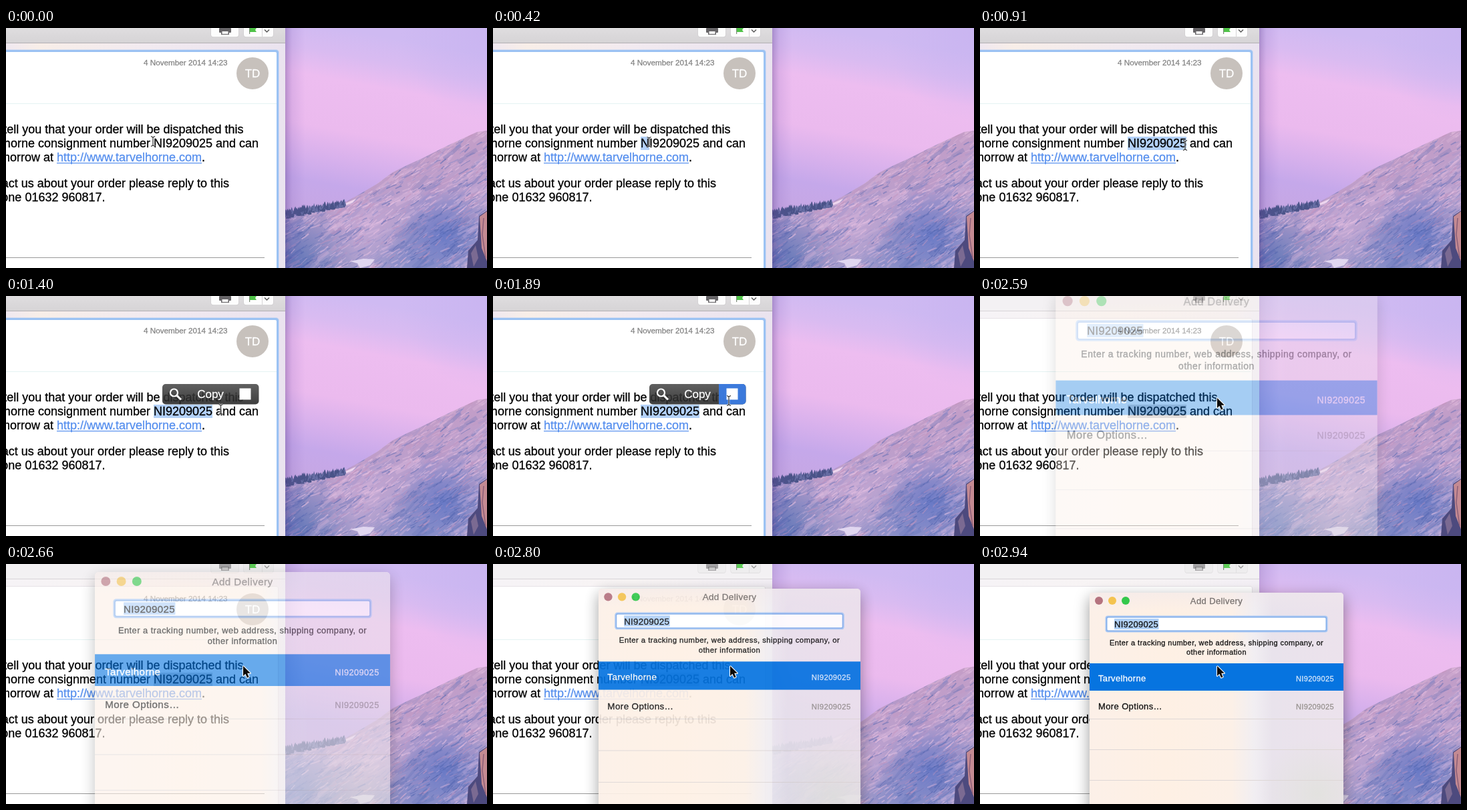
An HTML page with a canvas that plays this animation: 720x360 px, repeating every 4.44 s.

```html
<!DOCTYPE html>
<html lang="en">
<head>
<meta charset="utf-8">
<title>Add Delivery</title>
<style>
html, body { margin: 0; width: 100%; height: 100%; overflow: hidden; background: #fff; }
canvas { display: block; width: 720px; height: 360px; }
</style>
</head>
<body>
<canvas id="stage" width="720" height="360"></canvas>
<script>
const W = 720, H = 360, STEP = 70, LAST = 2940, LOOP = 4440;
const SANS = '"Liberation Sans", Arial, sans-serif';
const NUMBER = 'NI9209025';
const COURIER = 'Tarvelhorne';

const layer = () => Object.assign(document.createElement('canvas'), { width: W, height: H });
const stage = document.getElementById('stage').getContext('2d');
const desktop = layer();
const overlay = layer().getContext('2d');

const clamp = v => Math.max(0, Math.min(1, v));
const ramp = (t, from, to) => clamp((t - from) / (to - from));
const smooth = p => p * p * (3 - 2 * p);

// A hairline stroke gives the slightly heavier desktop text weight.
function text(c, str, x, y, size, color, align = 'left', spacing = 0) {
  c.font = `${size}px ${SANS}`;
  c.letterSpacing = spacing + 'px';
  c.textAlign = align;
  c.fillStyle = c.strokeStyle = color;
  c.lineWidth = .3;
  c.fillText(str, x, y);
  c.strokeText(str, x, y);
}

function rect(c, x, y, w, h, color) {
  c.fillStyle = color;
  c.fillRect(x, y, w, h);
}

function round(c, x, y, w, h, r, color) {
  c.beginPath();
  c.roundRect(x, y, w, h, r);
  c.fillStyle = color;
  c.fill();
}

function disc(c, x, y, r, color) {
  c.beginPath();
  c.arc(x, y, r, 0, Math.PI * 2);
  c.fillStyle = color;
  c.fill();
}

function poly(c, pts, color) {
  c.beginPath();
  pts.forEach(([x, y]) => c.lineTo(x, y));
  c.closePath();
  c.fillStyle = color;
  c.fill();
}

function line(c, pts, color, width) {
  c.beginPath();
  pts.forEach(([x, y], i) => i ? c.lineTo(x, y) : c.moveTo(x, y));
  c.strokeStyle = color;
  c.lineWidth = width;
  c.stroke();
}

function linear(c, x0, y0, x1, y1, stops) {
  const g = c.createLinearGradient(x0, y0, x1, y1);
  stops.forEach(([p, color]) => g.addColorStop(p, color));
  return g;
}

function glow(c, x, y, r, rgb, alpha) {
  const g = c.createRadialGradient(x, y, 0, x, y, r);
  g.addColorStop(0, `rgba(${rgb},${alpha})`);
  g.addColorStop(1, `rgba(${rgb},0)`);
  rect(c, x - r, y - r, 2 * r, 2 * r, g);
}

function random(seed) {
  return () => (seed = (seed * 16807) % 2147483647) / 2147483647;
}

function paintSky(c) {
  rect(c, 0, 0, W, H, linear(c, 500, 0, 450, 270, [
    [0, '#cfbaf2'], [.14, '#d9bbf1'], [.28, '#edbdf0'], [.55, '#ebbaee'], [.72, '#d6b0ec'], [.85, '#c5a8ea'], [1, '#c6a7e4']
  ]));
  glow(c, 720, 10, 130, '198,178,240', .6);
}

// Rock streaks falling down and left across the slope.
function paintStreaks(c, rnd, count, length, width, alpha) {
  for (let i = 0; i < count; i++) {
    const x = 415 + rnd() * 325, y = 150 + rnd() * 215;
    const angle = 2.3 + rnd() * .5, len = length * (.4 + rnd());
    const shade = Math.hypot(x - 650, (y - 312) * 1.2) < 55 || x + 360 - y < 500;
    const k = rnd() + (shade ? .4 : 0);
    const color = k < .45 ? '232,194,226' : k < .65 ? '196,148,190' : k < .85 ? '136,136,200' : '80,100,174';
    const dx = Math.cos(angle) * len, dy = Math.sin(angle) * len;
    line(c, [[x, y], [x + dx * .5, y + dy * (.35 + rnd() * .3)], [x + dx, y + dy]],
      `rgba(${color},${alpha * (.6 + rnd() * .8)})`, width * (.5 + rnd()));
  }
}

function paintDesktop(c) {
  const rnd = random(4127);
  paintSky(c);

  const ridge = [[418, 276], [460, 268], [505, 263], [530, 249], [555, 234], [578, 217],
    [600, 206], [622, 196], [640, 187], [662, 176], [690, 163], [705, 156], [720, 154]];
  c.save();
  c.beginPath();
  ridge.forEach(([x, y]) => c.lineTo(x, y));
  c.lineTo(W, H);
  c.lineTo(418, H);
  c.clip();
  rect(c, 418, 150, 302, 210, linear(c, 590, 180, 640, 360, [
    [0, '#c59dc6'], [.45, '#b99fcd'], [1, '#a09ccb']
  ]));
  glow(c, 430, 350, 95, '84,112,180', .85);
  glow(c, 655, 310, 75, '88,112,196', .8);
  glow(c, 600, 350, 60, '104,124,196', .45);
  glow(c, 540, 300, 60, '204,174,216', .55);

  paintStreaks(c, rnd, 260, 32, 5, .22);
  paintStreaks(c, rnd, 1900, 12, 1.3, .42);

  poly(c, [[515, 350], [535, 346], [552, 347], [545, 356], [530, 360], [526, 353]], '#e0d6f0');
  poly(c, [[508, 263], [524, 256], [519, 262], [509, 266]], '#eed6ee');
  poly(c, [[690, 360], [692, 334], [706, 318], [708, 282], [720, 274], [720, 360]], '#4d4a7e');
  poly(c, [[709, 283], [720, 275], [720, 350], [712, 330]], '#c48a92');
  line(c, [[715, 285], [713, 310], [718, 345]], '#8d5f78', 1.5);
  poly(c, [[696, 338], [703, 326], [707, 345], [700, 358]], '#7b6a92');
  c.restore();

  // Dark forest edge, thinning out to the right.
  for (let i = 0; i < 190; i++) {
    const p = rnd(), x = 415 + p * 92;
    const y = 274 - p * 13 + rnd() * (10 - p * 6);
    const h = 5 + rnd() * 5;
    poly(c, [[x - 2.5, y + 4], [x, y + 4 - h], [x + 2.5, y + 4]], rnd() < .6 ? '#4a5388' : '#666da3');
  }
}

function paintButtons(c, active) {
  c.save();
  c.globalAlpha = active ? 1 : .55;
  const edge = '#cbc9cb';
  round(c, 306.5, -8, 42, 22, 4, edge);
  round(c, 307, -8, 41, 21.3, 3.5, '#fdfdfd');
  round(c, 355.5, -8, 45, 22, 4, edge);
  round(c, 356, -8, 44, 21.3, 3.5, '#fdfdfd');
  rect(c, 383, 0, 1, 13, '#d6d4d6');
  round(c, 319, 0, 18, 7, 1, '#666467');
  rect(c, 322, 4, 12, 6, '#666467');
  rect(c, 323.5, 5, 9, 4, '#f4f4f4');
  line(c, [[387, 2.5], [390.5, 6], [394, 2.5]], '#555', 1.4);
  c.restore();
  rect(c, 364, 0, 1.2, 9, '#7b8a78');
  poly(c, [[365, 0], [375, 0], [373, 3], [375, 6], [365, 6]], active ? '#4fc247' : '#5ecb57');
}

function paintMail(c, active, selected) {
  rect(c, 418, 0, 30, H, linear(c, 418, 0, 448, 0, [
    [0, `rgba(80,50,130,${active ? .34 : .18})`], [.35, 'rgba(110,80,170,.13)'], [1, 'rgba(120,90,180,0)']
  ]));
  rect(c, 0, 0, 418, H, linear(c, 0, 0, 418, 0, active
    ? [[0, '#f0e8f0'], [.12, '#f8eee8'], [.5, '#f2eaf0'], [1, '#eae3ef']]
    : [[0, '#f6f3f6'], [.5, '#f8f4f4'], [1, '#f3eff5']]));
  rect(c, 0, 0, 418, 22, active
    ? linear(c, 0, 0, 0, 22, [[0, '#dfdddf'], [1, '#d6d4d6']]) : '#f3f1f3');
  rect(c, 0, 22, 418, 1, active ? '#b3b0b4' : '#d8d5d8');
  paintButtons(c, active);

  if (active) round(c, -10, 32, 419, 340, 5, 'rgba(155,194,243,.35)');
  round(c, -10, 33, 418, 340, 4, active ? '#9bc2f3' : '#e6e2e7');
  const inset = active ? 3 : 1;
  round(c, -10, 33 + inset, 418 - inset, 340, 2, '#fff');
  text(c, '4 November 2014 14:23', 206, 56, 11.7, '#858585');
  disc(c, 369, 68, 24, '#c7c1bc');
  text(c, 'TD', 369, 74, 17, '#fff', 'center');
  rect(c, 0, 113, 405, 1, '#e4f2f2');
  rect(c, 0, 344, 387, 1, '#999');

  c.font = `18px ${SANS}`;
  c.letterSpacing = '0px';
  if (selected) {
    const w = c.measureText(NUMBER.slice(0, selected)).width;
    rect(c, 221, 163, w, 20, active ? '#b3d1f8' : '#d5d5d8');
  }
  const body = (str, x, y, align = 'right') => text(c, str, x, y, 18, '#000', align);
  body('tell you that your order will be dispatched this', 355.5, 158);
  body(COURIER + ' consignment number ', 221, 179);
  body(NUMBER + ' and can', 221, 179, 'left');
  body('tomorrow at ', 76, 200);
  const link = `http://www.${COURIER.toLowerCase()}.com`;
  text(c, link, 76, 200, 18, '#568fee');
  const end = 76 + c.measureText(link).width;
  rect(c, 76, 202, end - 76, 1.2, '#568fee');
  body('.', end, 200, 'left');
  body('contact us about your order please reply to this', 334, 239);
  body('phone 01632 960817.', 148.5, 260);
}

function paintPopup(c, hover) {
  round(c, 234, 132, 144.5, 30.5, 5,
    linear(c, 0, 132, 0, 162, [[0, 'rgba(74,74,74,.88)'], [1, 'rgba(36,36,36,.88)']]));
  if (hover) round(c, 338, 132, 40.5, 30.5, [0, 5, 5, 0], 'rgba(58,124,228,.94)');
  c.beginPath();
  c.arc(251.5, 145, 5.5, 0, Math.PI * 2);
  c.strokeStyle = '#fff';
  c.lineWidth = 2.2;
  c.stroke();
  line(c, [[255.5, 149], [262, 155.5]], '#fff', 3);
  text(c, 'Copy', 306, 153, 17, '#fff', 'center');
  rect(c, 349.5, 138.5, 17, 17, '#fff');
}

function paintWindow(c) {
  c.save();
  c.shadowColor = 'rgba(0,0,0,.4)';
  c.shadowBlur = 22;
  c.shadowOffsetY = 7;
  round(c, 164, 43, 380, 380, 5, '#f5ebe8');
  c.restore();
  c.save();
  c.beginPath();
  c.roundRect(164, 43, 380, 380, 5);
  c.clip();
  rect(c, 164, 43, 380, 380, linear(c, 164, 0, 544, 0, [
    [0, '#fcf0e8'], [.3, '#fef0e4'], [.56, '#fcf0e7'], [.65, '#f1eef2'], [.72, '#e9e3ec'], [1, '#ece2ec']
  ]));
  glow(c, 505, 345, 85, '226,226,222', .9);
  rect(c, 164, 43, 380, 28, linear(c, 0, 43, 0, 71, [[0, 'rgba(240,232,236,.5)'], [1, 'rgba(240,232,236,0)']]));
  c.restore();

  ['#b5737f', '#f4c350', '#34c84b'].forEach((color, i) => disc(c, 178 + 20 * i, 55, 6, color));
  text(c, 'Add Delivery', 354, 60, 13, '#77716f', 'center', .38);

  round(c, 187.5, 77.5, 333, 25, 4, '#a9c8f3');
  round(c, 189, 79, 330, 22, 3, '#83aeea');
  round(c, 190.5, 80.5, 327, 19, 1.5, '#fff');
  rect(c, 201, 82, 66.5, 16, '#b1d1f7');
  text(c, NUMBER, 201, 95, 13, '#151515', 'left', .27);

  text(c, 'Enter a tracking number, web address, shipping company, or', 354, 122, 11, '#151515', 'center', .43);
  text(c, 'other information', 354, 136, 11, '#151515', 'center', .43);

  rect(c, 164, 149, 380, 41, '#0674e0');
  text(c, COURIER, 177, 176, 13, '#fff', 'left', .33);
  text(c, NUMBER, 530, 176, 11, '#d5e7fb', 'right', .36);
  text(c, 'More Options…', 177, 218, 13, '#151515', 'left', .38);
  text(c, NUMBER, 530, 218, 11, '#97928f', 'right', .36);
  [232, 278, 324].forEach(y => rect(c, 164, y, 380, 1, '#ded7d6'));
}

// time, x, y
const path = [[0, 220, 170], [280, 220, 170], [840, 307, 176], [1190, 307, 176],
  [1750, 353, 157], [2030, 353, 157], [2240, 355, 153]];

function pointer(t) {
  const i = path.findIndex(k => k[0] > t);
  if (i < 0) return path[path.length - 1].slice(1);
  const [t0, x0, y0] = path[i - 1], [t1, x1, y1] = path[i];
  const p = smooth(ramp(t, t0, t1));
  return [x0 + (x1 - x0) * p, y0 + (y1 - y0) * p];
}

function paintBeam(c, x, y) {
  [['rgba(255,255,255,.7)', 2.6], ['#222', 1.1]].forEach(([color, w]) => {
    line(c, [[x, y - 6], [x, y + 6]], color, w);
    line(c, [[x - 3, y - 7.5], [x, y - 6], [x + 3, y - 7.5]], color, w);
    line(c, [[x - 3, y + 7.5], [x, y + 6], [x + 3, y + 7.5]], color, w);
  });
}

function paintArrow(c, x, y) {
  const shape = [[0, 0], [0, 15], [3.4, 11.8], [6, 17.5], [8.6, 16.4], [6.2, 10.8], [10.8, 10.8]]
    .map(([dx, dy]) => [x + dx, y + dy]);
  c.lineJoin = 'round';
  line(c, [...shape, shape[0]], '#fff', 2.2);
  poly(c, shape, '#0a0a0a');
}

function blend(alpha, scale, paint) {
  if (alpha <= 0) return;
  const cx = 354, cy = 233;
  overlay.clearRect(0, 0, W, H);
  overlay.save();
  overlay.translate(cx, cy);
  overlay.scale(scale, scale);
  overlay.translate(-cx, -cy);
  paint(overlay);
  overlay.restore();
  stage.globalAlpha = alpha;
  stage.drawImage(overlay.canvas, 0, 0);
  stage.globalAlpha = 1;
}

function render(t) {
  const [x, y] = pointer(t);
  const clicked = t >= 2310;
  const selected = Math.round(clamp((x - 221) / 85) * NUMBER.length);
  stage.drawImage(desktop, 0, 0);
  paintMail(stage, t < 2590, selected);

  blend(ramp(t, 1190, 1330) * (1 - ramp(t, 2310, 2450)), 1, c => paintPopup(c, x > 338 && !clicked));

  if (t >= 2520) {
    const left = Math.max(0, 2911 - t);
    blend(1 - (left / 400) ** 2, 1 + (left / 622) ** 2, paintWindow);
  }
  (clicked ? paintArrow : paintBeam)(stage, x, y);
}

paintDesktop(desktop.getContext('2d'));
const start = performance.now();
function tick() {
  const t = (performance.now() - start) % LOOP;
  render(Math.min(LAST, Math.floor(t / STEP) * STEP));
  requestAnimationFrame(tick);
}
tick();
</script>
</body>
</html>
```
